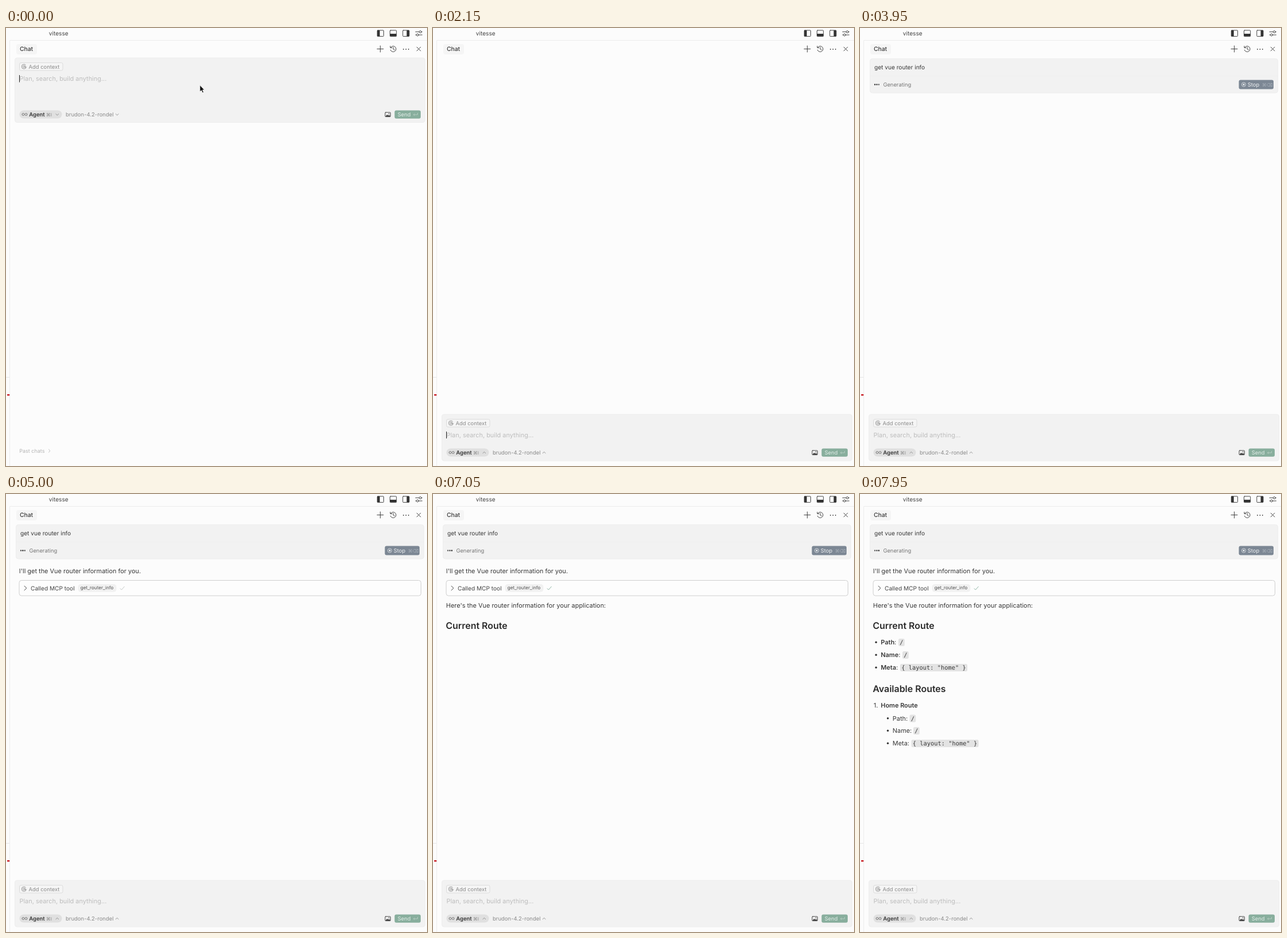
An HTML page for the animation above (8 s loop, 734x763 px).

```html
<!DOCTYPE html>
<html lang="en">
<head>
<meta charset="utf-8">
<title>Chat panel</title>
<style>
html, body { margin: 0; width: 100%; height: 100%; overflow: hidden; background: #fcfcfc; }
svg { display: block; width: 734px; height: 763px; font-family: Inter, sans-serif; text-rendering: geometricPrecision; }
text { white-space: pre; fill: #383838; }
[data-in], [data-out] { visibility: hidden; }
.body { font-size: 10.93px; }
.ui { font-size: 10.15px; }
.small { font-size: 9.4px; }
.bold { font-weight: 600; }
.head { font-size: 15.95px; font-weight: 600; fill: #2a2a2a; }
.code { font: 10.4px "DejaVu Sans Mono", monospace; }
.key { font-family: "DejaVu Sans", sans-serif; font-size: 7.8px; }
.hint { fill: #bdbdbd; }
.mute { fill: #8a8a8a; }
.pill { fill: #e3e3e3; }
.line { fill: none; stroke: #444; stroke-width: 1; stroke-linecap: round; stroke-linejoin: round; }
.thin { fill: none; stroke: #8a8a8a; stroke-width: .9; }
.card { fill: #f2f2f2; stroke: #ededed; }
.caret { fill: #222; }
</style>
</head>
<body>
<svg viewBox="0 0 734 763">
  <defs>
    <g id="context">
      <rect x="23.5" y="60.5" width="75.5" height="13.5" rx="2.5" fill="#f5f5f5" stroke="#dcdcdc"/>
      <circle cx="31.3" cy="67.2" r="4" class="thin" stroke-dasharray="22 3.1"/>
      <circle cx="31.3" cy="67.2" r="1.7" class="thin"/>
      <path d="M33 65.5v2.4q1 1.5 2.1 0" class="thin"/>
      <text x="39.6" y="70.5" class="small mute">Add context</text>
    </g>
    <g id="tools">
      <rect x="23.5" y="143.5" width="74" height="14" rx="7" fill="#e0e0e0"/>
      <path d="M32.5 150.5c-1.6-2.6-4.4-2.3-4.4 0s2.8 2.6 4.4 0 4.4-2.3 4.4 0-2.8 2.6-4.4 0" class="thin" style="stroke:#555"/>
      <text x="40.2" y="154" class="bold" font-size="9.5">Agent</text>
      <text x="70" y="153.6" class="key mute">⌘I</text>
      <text x="104" y="154" class="mute" font-size="9.5">brudon-4.2-rondel</text>
      <rect x="661" y="147" width="9.4" height="7.6" rx="1" class="line"/>
      <path d="M661.5 154l3-3.2 1.8 1.8 1.6-1.4 2 2.3v1z" fill="#444"/>
      <circle cx="667.7" cy="149.4" r=".8" fill="#444"/>
      <rect x="677.5" y="143.5" width="45.5" height="14.3" rx="3" fill="#88ae9d"/>
      <rect x="677.5" y="143.5" width="45.5" height="14.3" rx="3" fill="#1c6b48" data-in="1500" data-out="2100"/>
      <text x="682.8" y="154" class="small" style="fill:#e3eee9">Send</text>
      <path d="M717.5 148v3h-7m2-2l-2 2 2 2" fill="none" stroke="#bfd4ca" stroke-width=".8"/>
    </g>
  </defs>

  <rect width="734" height="763" fill="#fcfcfc"/>
  <path d="M6.5 763V21.5H734" fill="none" stroke="#ececec"/>
  <path d="M0 608.5H6" stroke="#e6e6e6"/>
  <rect x="2" y="638" width="4.2" height="2.4" fill="#c8141e"/>

  <!-- title bar -->
  <text x="74.8" y="13" class="ui" style="fill:#444">vitesse</text>
  <g class="line">
    <rect x="647.3" y="4" width="11.2" height="10.6" rx="1"/>
    <rect x="669.5" y="4" width="11.2" height="10.6" rx="1"/>
    <rect x="691.8" y="4" width="11.2" height="10.6" rx="1"/>
    <path d="M714 6.7h6.5m4 0h1M714 12h1.5m4 0h6"/>
    <circle cx="722.4" cy="6.7" r="1.9"/><circle cx="717.5" cy="12" r="1.9"/>
  </g>
  <path d="M647.3 4h4.4v10.6h-4.4zM669.5 10h11.2v4.6h-11.2zM698.6 4h4.4v10.6h-4.4z" fill="#333"/>

  <!-- chat header -->
  <rect x="18" y="28" width="36" height="18" rx="4" fill="#f5f5f5"/>
  <text x="24" y="40.3" font-size="10.3" font-weight="500">Chat</text>
  <g class="line">
    <path d="M647 36.5h11M652.5 31v11"/>
    <path d="M670.6 34.2a5 5 0 1 1-.3 4M670 31.5v3h3M675.2 33.7v3.2l2.3 1.3"/>
    <path d="M716.2 33.2l6.7 6.7m0-6.7l-6.7 6.7"/>
  </g>
  <g fill="#444"><circle cx="693" cy="37" r=".9"/><circle cx="697.4" cy="37" r=".9"/><circle cx="701.8" cy="37" r=".9"/></g>

  <!-- fresh chat -->
  <g data-in="0" data-out="2100">
    <rect x="15.5" y="52" width="715" height="112.5" rx="4" class="card"/>
    <use href="#context"/><use href="#tools"/>
    <path d="M86.6 149.4l2.7 2.6 2.7-2.6M191 149.4l2.7 2.6 2.7-2.6" class="thin"/>
    <text x="23.5" y="92.4" class="body hint" data-out="1500">Plan, search, build anything...</text>
    <text x="23.5" y="92.4" class="body" data-in="1500" data-rate="24" id="typed">get vue router info</text>
    <rect x="23" y="82" width="1" height="12.5" class="caret" id="topCaret"/>
    <text x="23.3" y="739.8" font-size="9" style="fill:#b4b4b4">Past chats</text>
    <path d="M74.2 733.8l2.8 2.8-2.8 2.8" class="thin" style="stroke:#b4b4b4"/>
    <path d="M338 99.5v11.6l2.7-2.4 1.9 4.2 2-.9-1.9-4.1h3.4z" fill="#111" stroke="#fff" stroke-width=".8" data-out="1500"/>
  </g>

  <!-- running chat -->
  <g data-in="2100">
    <rect x="15.5" y="673" width="715" height="81" rx="4" class="card"/>
    <use href="#context" y="621"/><use href="#tools" y="589"/>
    <path d="M86.6 741l2.7-2.6 2.7 2.6M191 741l2.7-2.6 2.7 2.6" class="thin"/>
    <text x="23.5" y="713.4" class="body hint">Plan, search, build anything...</text>
    <rect x="23" y="703" width="1" height="12" class="caret" id="lowCaret"/>
  </g>

  <g data-in="2250">
    <rect x="17.5" y="53.5" width="711" height="59.5" rx="4" class="card"/>
    <path d="M18 83.5H728" stroke="#efefef"/>
    <text x="25" y="71.8" class="ui">get vue router info</text>
    <g id="dots" fill="#222"><circle cx="26" cy="98.5" r="1.2"/><circle cx="29.4" cy="98.5" r="1.2"/><circle cx="32.8" cy="98.5" r="1.2"/></g>
    <text x="40.4" y="102" class="small" style="fill:#777">Generating</text>
    <rect x="660.5" y="90.5" width="60.5" height="16" rx="3" fill="#7c8794"/>
    <circle cx="669" cy="98.5" r="3.6" fill="none" stroke="#e6e9ec" stroke-width=".8"/>
    <rect x="667.6" y="97.1" width="2.8" height="2.8" fill="#e6e9ec"/>
    <text x="675.8" y="102" class="small" style="fill:#f0f2f4">Stop</text>
    <text x="701" y="101.5" class="key" style="fill:#a9b1ba">⌘⌫</text>
  </g>

  <!-- answer -->
  <text x="22.8" y="137.5" class="body" data-in="4350" data-rate="7">I'll get the Vue router information for you.</text>
  <g data-in="4750">
    <rect x="23" y="150.5" width="700.5" height="26.7" rx="4" fill="#fdfdfd" stroke="#cfcfcf"/>
    <path d="M32 160.2l3.8 3.8-3.8 3.8" class="line"/>
    <text x="43" y="167.6" class="ui" style="fill:#444">Called MCP tool</text>
    <rect x="125.5" y="157" width="67" height="13.6" rx="5" fill="#f1f1f1"/>
    <text x="129.8" y="166.3" font-size="8.1" style="fill:#505050">get_router_info</text>
    <path d="M199 164.4l2.4 2.6 5.2-6" fill="none" stroke="#c6cac8" id="check"/>
  </g>
  <text x="22.8" y="198" class="body" data-in="6450" data-rate="7">Here's the Vue router information for your application:</text>
  <text x="22.3" y="235.2" class="head" data-in="6880" data-rate="9">Current Route</text>
  <g id="list"></g>
  <text x="22.3" y="345.2" class="head" data-in="7430" data-rate="6">Available Routes</text>
  <g data-in="7540">
    <text x="23.8" y="372" class="body">1.</text>
    <text x="36.3" y="372" class="body bold" data-in="7550" data-rate="7">Home Route</text>
  </g>
</svg>
<script>
const LOOP = 8000;
const $ = s => document.querySelector(s);

// label, baseline, left edge of code pill, start time
const meta = '{ layout: "home" }';
function item(x, y, label, bold, codeX, code, at) {
  const w = code.length * 6.26;
  return `<g data-in="${at}"><circle cx="${x - 8.3}" cy="${y - 3.8}" r="1.7" fill="#333"/>
    <text x="${x}" y="${y}" class="body"><tspan class="${bold ? 'bold' : ''}">${label}</tspan>:</text></g>
    <g data-in="${at + 45}"><rect x="${codeX}" y="${y - 10}" width="${w + 4.5}" height="13" rx="2.5" class="pill"/>
    <text x="${codeX + 2.2}" y="${y}" class="code" data-in="${at + 45}" data-rate="6">${code}</text></g>`;
}
$('#list').innerHTML =
  item(36.3, 262, 'Path', true, 67, '/', 7100) +
  item(36.3, 284, 'Name', true, 74, '/', 7180) +
  item(36.3, 306, 'Meta', true, 70, meta, 7260) +
  item(56.8, 394.5, 'Path', false, 86.5, '/', 7630) +
  item(56.8, 416, 'Name', false, 93, '/', 7700) +
  item(56.8, 438, 'Meta', false, 89.5, meta, 7770);

const timed = [...document.querySelectorAll('[data-in], [data-out]')].map(el => ({
  el,
  from: +(el.dataset.in || 0),
  to: +(el.dataset.out || LOOP),
  rate: +el.dataset.rate,
  text: el.textContent
}));
const show = (el, on) => { el.style.visibility = on ? 'inherit' : 'hidden'; };
const dots = [...$('#dots').children];
const typed = $('#typed'), topCaret = $('#topCaret'), lowCaret = $('#lowCaret'), check = $('#check');

function render(t) {
  for (const { el, from, to, rate, text } of timed) {
    show(el, t >= from && t < to);
    if (rate) el.textContent = text.slice(0, Math.max(0, Math.floor((t - from) / rate) + 1));
  }
  const typing = t >= 1500;
  show(topCaret, t < 2100 && (t < 250 || (t >= 750 && t < 1150) || typing));
  topCaret.setAttribute('x', 23 + (typing && t < 2100 ? typed.getComputedTextLength() + 1 : 0));
  show(lowCaret, t >= 2100 && (t - 2100) % 1000 < 500);
  check.style.stroke = t < 5200 ? '#c6cac8' : '#93b8a8';
  dots.forEach((d, i) => {
    d.style.opacity = 0.85 + 0.15 * Math.sin(2 * Math.PI * (t / 900 - i / 3));
  });
}
function tick() {
  render(performance.now() % LOOP);
  requestAnimationFrame(tick);
}
tick();
</script>
</body>
</html>
```
